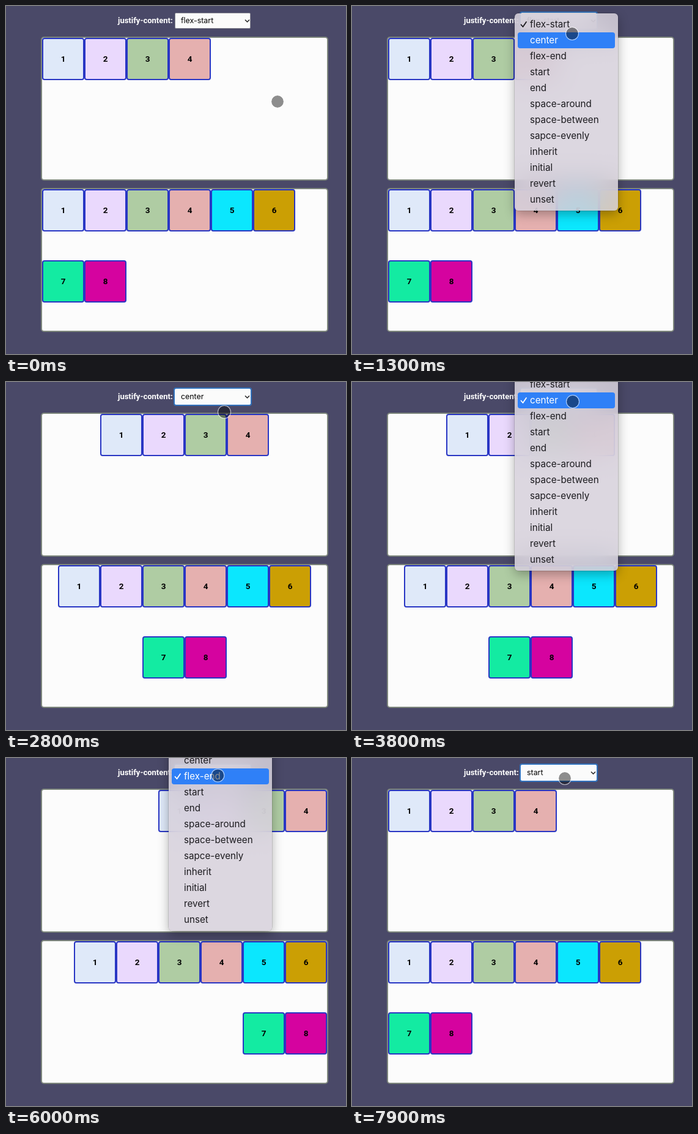
Animation, 556 px wide and 568 px high, one loop 8000 ms. Source, as an HTML page:

```html
<!DOCTYPE html>
<html lang="en">
<head>
<meta charset="utf-8">
<title>justify-content demo</title>
<style>
  html, body { margin: 0; width: 100%; height: 100%; overflow: hidden; background: #4a4968; }
  * { box-sizing: border-box; }
  body > * { position: absolute; }
  .label { left: 183px; top: 14px; font: bold 13px/20px Roboto, sans-serif; color: #fff; white-space: nowrap; }
  .select {
    left: 276px; top: 11px; width: 124px; height: 26px; padding-left: 9px;
    background: #fbfbfb; border: 1px solid #8a8a94; border-radius: 2px;
    font: 12.4px/24px Inter, sans-serif; color: #000;
  }
  .select.focus { border-color: #fff; box-shadow: 0 0 0 2px #3272bd; }
  .select svg { position: absolute; left: 113px; top: 9px; }
  .flex {
    left: 57px; width: 470px; height: 235px; border: 2px solid #7d867c; border-radius: 5px;
    background: #fcfcfc; display: flex; flex-wrap: wrap;
  }
  .box {
    width: 69px; height: 69px; border: 2px solid #2936c4; border-radius: 4px;
    font: bold 13.5px/65px Roboto, sans-serif; text-align: center; color: #000;
  }
  .menu {
    left: 266px; width: 169px; padding: 5px; border-radius: 6px;
    background: rgba(215, 209, 219, .86); backdrop-filter: blur(22px);
    box-shadow: 0 0 0 .5px rgba(0, 0, 0, .25), 0 6px 18px rgba(0, 0, 0, .3);
    font: 15.2px/26px Inter, sans-serif; color: #1b1a1e;
  }
  .item { position: relative; height: 26px; padding-left: 20px; border-radius: 4px; white-space: nowrap; }
  .item.hot { background: #2f80f7; color: #fff; }
  .item svg { position: absolute; left: 4px; top: 7px; visibility: hidden; }
  .item.on svg { visibility: visible; }
  .cursor {
    left: -11px; top: -11px; width: 22px; height: 22px; border-radius: 50%;
    background: rgba(0, 0, 0, .44) padding-box; border: 1.5px solid rgba(255, 255, 255, .65);
  }
</style>
</head>
<body>
<div class="label">justify-content:</div>
<div class="select"><span></span>
  <svg width="9" height="7" fill="none" stroke="#222" stroke-width="1.5"><path d="M1 1.5 4.5 5 8 1.5"/></svg>
</div>
<div class="flex" style="top:50px"></div>
<div class="flex" style="top:297px"></div>
<div class="menu"></div>
<div class="cursor"></div>
<script>
const LOOP = 8000, STEP = 100, ROW = 26;
const $ = s => document.querySelector(s);
const options = ['flex-start', 'center', 'flex-end', 'start', 'end', 'space-around',
  'space-between', 'sapce-evenly', 'inherit', 'initial', 'revert', 'unset'];
const colors = ['#dfe9f9', '#ead9fd', '#afcca3', '#e5b0af', '#0be7fe', '#cb9f04', '#13eba2', '#d5039f'];

// Each session opens the menu on one option and picks another.
const sessions = [
  { open: 1000, click: 2000, from: 0, to: 1 },
  { open: 3300, click: 4300, from: 1, to: 2 },
  { open: 5900, click: 7000, from: 2, to: 3 }
];

// Pointer path: time, x, y
const path = [
  [0, 444, 156], [200, 441, 148], [800, 350, 26], [1000, 350, 26], [1300, 360, 45],
  [1600, 358, 54], [2000, 357, 52], [2800, 357, 49], [3200, 360, 30], [3800, 361, 32],
  [4100, 354, 54], [4400, 351, 54], [4800, 350, 51], [5500, 348, 30], [6200, 346, 28],
  [6700, 343, 51], [7300, 343, 52], [7900, 348, 33]
];

const flexes = [...document.querySelectorAll('.flex')];
flexes.forEach((flex, i) => {
  flex.innerHTML = colors.slice(0, 4 + 4 * i)
    .map((c, n) => `<div class="box" style="background:${c}">${n + 1}</div>`).join('');
});
const menu = $('.menu');
menu.innerHTML = options.map(o => `<div class="item"><svg width="12" height="12" fill="none"
  stroke="currentColor" stroke-width="1.8" stroke-linecap="round" stroke-linejoin="round"><path
  d="M1.5 6.5 4.5 10 10 2"/></svg>${o}</div>`).join('');
const items = [...menu.children];

function pointer(t) {
  const i = path.findIndex(p => p[0] > t);
  if (i < 0) return path[path.length - 1].slice(1);
  const [a, b] = [path[i - 1], path[i]];
  const u = (t - a[0]) / (b[0] - a[0]), k = u * u * (3 - 2 * u);
  return [1, 2].map(j => a[j] + (b[j] - a[j]) * k);
}

function draw(t) {
  const [x, y] = pointer(t);
  $('.cursor').style.transform = `translate(${x}px, ${y}px)`;

  const done = sessions.filter(s => t >= s.click + 300).pop();
  const value = options[done ? done.to : 0];
  $('.select span').textContent = value;
  $('.select').classList.toggle('focus', t >= sessions[0].open);
  flexes.forEach(f => f.style.justifyContent = value);

  const s = sessions.find(s => t >= s.open && t < s.click + 400);
  menu.style.display = s ? 'block' : 'none';
  if (!s) return;
  const top = 12 - ROW * s.from;
  menu.style.top = top + 'px';
  menu.style.opacity = Math.min(1, (s.click + 400 - t) / 200);
  const blink = t >= s.click && t < s.click + 100;
  const hot = t >= s.click ? s.to : Math.floor((y - top - 5) / ROW);
  items.forEach((el, i) => {
    el.classList.toggle('hot', i === hot && !blink);
    el.classList.toggle('on', i === s.from);
  });
}

function frame() {
  const t = performance.now() % LOOP;
  draw(Math.floor(t / STEP) * STEP);
  requestAnimationFrame(frame);
}
frame();
</script>
</body>
</html>
```
